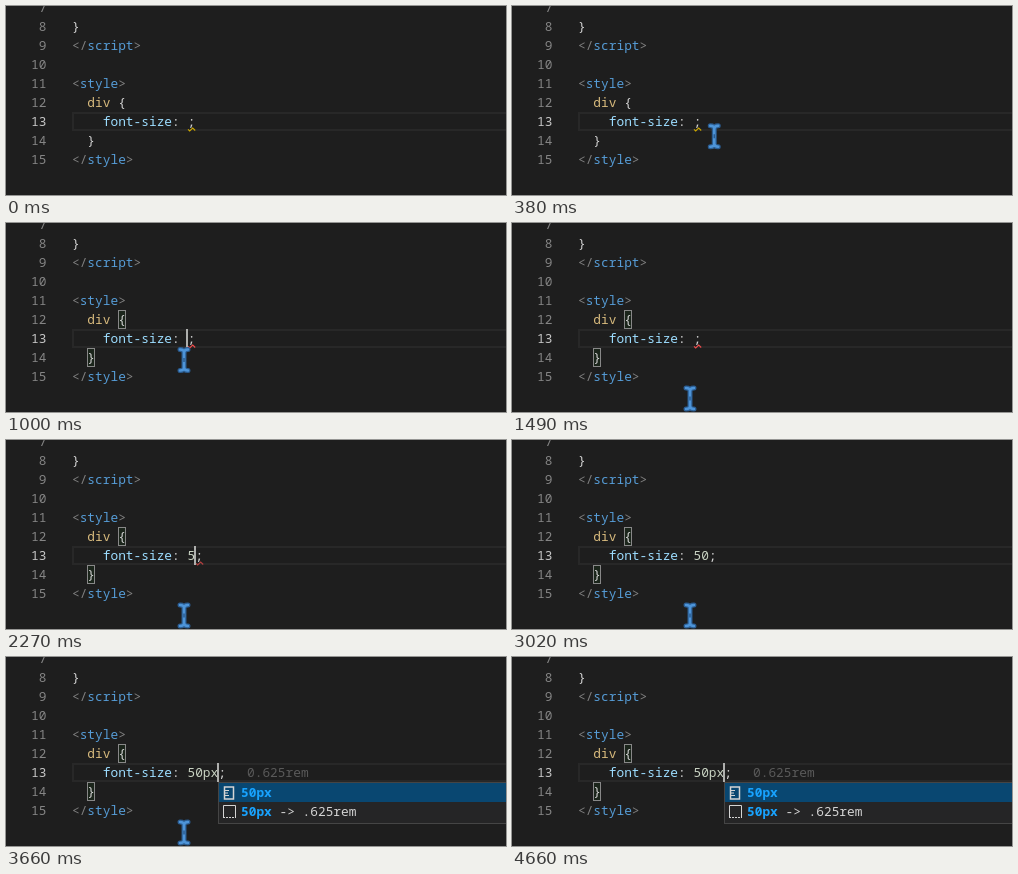
An HTML page for the animation above (5210 ms loop, 500 px wide and 189 px high).

```html
<!DOCTYPE html>
<html lang="en">
<head>
<meta charset="utf-8">
<title>Editor typing</title>
<style>
html, body { margin: 0; width: 100%; height: 100%; overflow: hidden; background: #1e1e1e; }
svg { display: block; width: 500px; height: 189px; }
text { font: 500 12.83px "Noto Sans Mono", "DejaVu Sans Mono", monospace; white-space: pre; }
.hit { font-weight: 600; fill: #18a3ff; }
</style>
</head>
<body>
<svg id="stage" viewBox="0 0 500 189"></svg>
<script>
const NS = 'http://www.w3.org/2000/svg';
const stage = document.getElementById('stage');
const LOOP = 5210, CHAR = 7.7, LEFT = 65.95, LINE = 19;
const INK = '#d4d4d4', GREY = '#808080', BLUE = '#569cd6', NUM = '#c8d2c2';

const colX = col => LEFT + col * CHAR;
const baseY = line => 120 + (line - 13) * LINE;

function add(parent, tag, attrs = {}, content) {
  const node = document.createElementNS(NS, tag);
  for (const key in attrs) node.setAttribute(key, attrs[key]);
  if (content !== undefined) node.textContent = content;
  return parent.appendChild(node);
}
const rect = (parent, x, y, width, height, fill, more = {}) =>
  add(parent, 'rect', { x, y, width, height, fill, ...more });
const show = (node, on) => node.setAttribute('visibility', on ? 'visible' : 'hidden');

function code(line, col, parts) {
  const text = add(stage, 'text', { x: colX(col), y: baseY(line) });
  return parts.map(([str, fill]) => add(text, 'tspan', { fill }, str));
}
const tag = (line, open, name) => code(line, 0, [[open, GREY], [name, BLUE], ['>', GREY]]);

// Current line and gutter
rect(stage, 67, 107, 440, 17, 'none', { stroke: '#282828', 'stroke-width': 2 });
for (let n = 7; n <= 15; n++) {
  add(stage, 'text', {
    x: 40.5, y: baseY(n), 'text-anchor': 'end', fill: n === 13 ? '#c6c6c6' : '#858585'
  }, n);
}

const brackets = add(stage, 'g');
for (const [col, line] of [[6, 12], [2, 14]]) {
  rect(brackets, Math.round(colX(col)) + .5, baseY(line) - 13.5, 7, 18, 'rgba(0,100,0,.1)', { stroke: '#888' });
}

code(8, 0, [['}', INK]]);
tag(9, '</', 'script');
tag(11, '<', 'style');
code(12, 2, [['div', '#d7ba7d'], [' {', INK]]);
const value = code(13, 4, [['font-size', '#9cdcfe'], [': ', INK], ['', NUM], [';', INK]])[2];
code(14, 2, [['}', INK]]);
tag(15, '</', 'style');

const hint = add(stage, 'text', { x: 241, y: baseY(13), fill: '#5a5a5a' }, '0.625rem');
const squiggle = add(stage, 'path', {
  d: 'M0 1.3l1.7 1.7l3-3l2.5 2.5', fill: 'none', 'stroke-width': 1.1
});
const caret = rect(stage, 0, 106, 2, 19, '#aeafad');

// Suggestion lists; rows are [matched, rest, icon]
function unitIcon(g, y) {
  rect(g, 6.5, y + 4, 9, 12, 'none', { stroke: INK, 'stroke-width': 1.5 });
  add(g, 'path', { d: `M7 ${y + 7.5}h4m-4 2.5h3m-3 2.5h4`, stroke: INK });
}
function snippetIcon(g, y) {
  add(g, 'path', { d: `M5.5 ${y + 15}v-11.5h12v11.5`, fill: 'none', stroke: INK });
  add(g, 'path', { d: `M5 ${y + 15.5}h13`, stroke: INK, 'stroke-dasharray': '2 1' });
}
function list(x, rows, chosen) {
  const g = add(stage, 'g', { transform: `translate(${x} 125)` });
  rect(g, .5, .5, 430, rows.length * LINE + 3, '#252526', { stroke: '#454545' });
  rows.forEach(([hit, rest, icon], i) => {
    const y = 1 + i * LINE;
    if (i === chosen) rect(g, 1, y, 429, LINE, '#094771');
    icon(g, y);
    const text = add(g, 'text', { x: 23, y: y + 14, fill: INK });
    add(text, 'tspan', { class: 'hit' }, hit);
    add(text, 'tspan', {}, rest);
  });
  return g;
}
const units = list(205, [
  ['50p', 'c', unitIcon], ['50p', 't', unitIcon], ['50p', 'x', unitIcon],
  ['50p', 'x -> .625rem', snippetIcon]
], 3);
const matches = list(212, [['50px', '', unitIcon], ['50px', ' -> .625rem', snippetIcon]], 0);

// Mouse pointer: a bright beam over a darker halo
const mouse = add(stage, 'g', { fill: 'none', 'stroke-linecap': 'round' });
for (const [stroke, width] of [['#2b5c90', 5], ['#4d94d8', 2.6]]) {
  add(mouse, 'path', {
    d: 'M-4 -10.5q4 0 4 3q0 -3 4 -3M0 -8v16M-4 10.5q4 0 4 -3q0 3 4 3',
    stroke, 'stroke-width': width
  });
}
rect(mouse, -.75, -2, 1.5, 4, '#2b5c90');

function pointer(t) {
  if (t < 70 || t >= 4590) return null;
  if (t < 240) return [251, 164];
  if (t < 740) {
    const k = Math.min(6, Math.floor((t - 240) / 68) + 1) / 6;
    const e = k * (2 - k);
    return [251 - 65 * e, 164 - 45 * e];
  }
  if (t < 800) return [181, 119];
  if (t < 1000) return [178, 118.5];
  if (t < 1060) return [178, 137];
  if (t < 1130) return [178, 161];
  return [178, t < 4520 ? 175.5 : 184];
}

const keys = [[2270, '5'], [2470, '50'], [3440, '50p'], [3660, '50px']];
const blinks = [[930, 1490], [1940, 3020], [3440, 4120], [4660, LOOP]];

function draw(t) {
  const typed = keys.reduce((str, [at, next]) => t >= at ? next : str, '');
  const end = colX(15 + typed.length);
  const focused = t >= 930;
  value.textContent = typed;
  caret.setAttribute('x', Math.round(end) - 1);
  show(caret, blinks.some(([on, off]) => t >= on && t < off));
  show(brackets, focused);
  squiggle.setAttribute('transform', `translate(${Math.round(end) + 1} 122)`);
  squiggle.setAttribute('stroke', focused ? '#f14c4c' : '#cca700');
  squiggle.setAttribute('opacity', typed ? .7 : 1);
  show(squiggle, t < 2740);
  show(units, typed === '50p');
  show(matches, typed === '50px');
  show(hint, typed === '50px');
  const at = pointer(t);
  show(mouse, at);
  if (at) mouse.setAttribute('transform', `translate(${at[0]} ${at[1]})`);
}

const start = performance.now();
function tick() {
  draw((performance.now() - start) % LOOP);
  requestAnimationFrame(tick);
}
tick();
</script>
</body>
</html>
```
